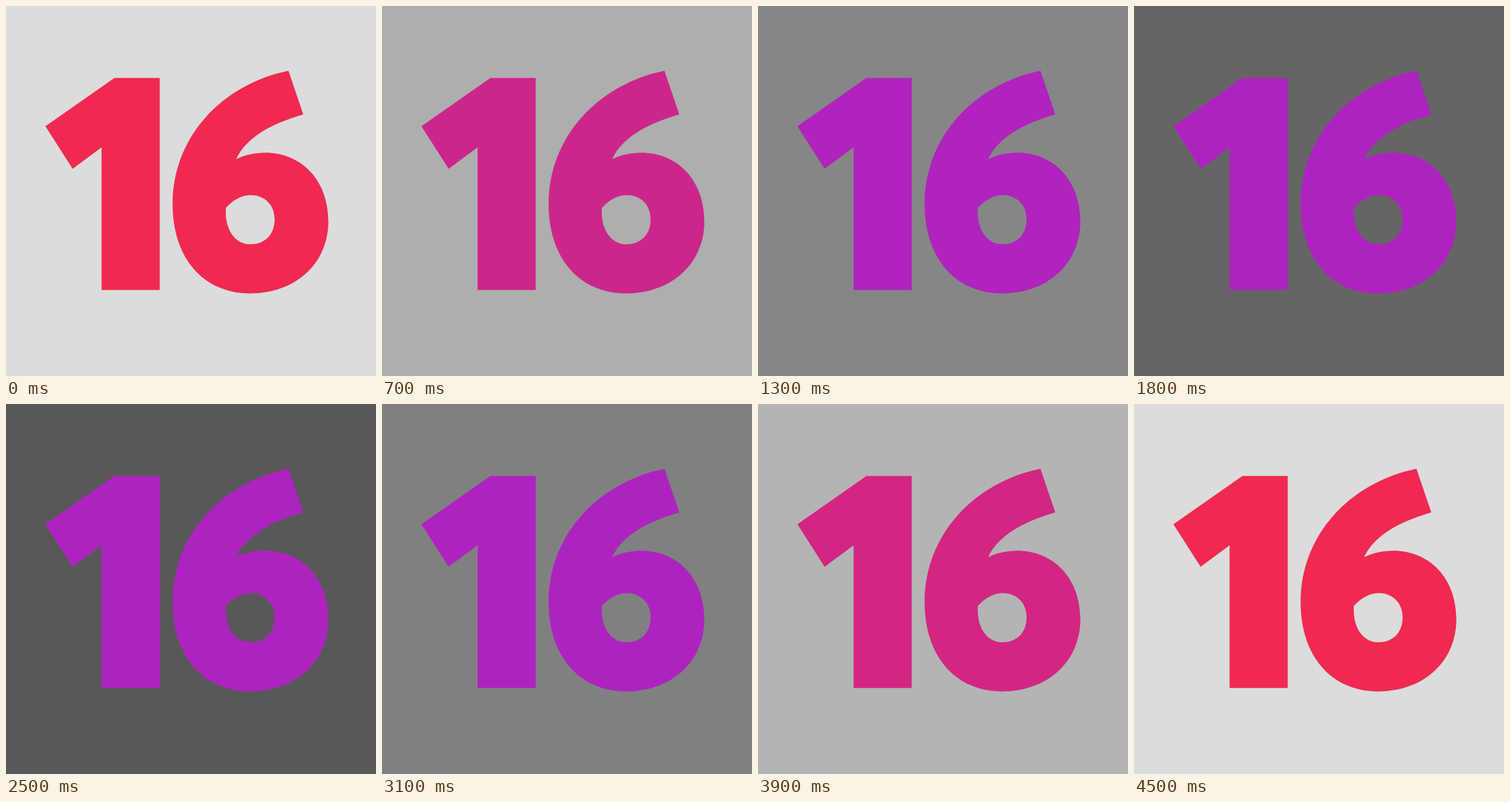
An HTML page for the animation above (4600 ms loop, 500 by 500 pixels).

```html
<!DOCTYPE html>
<html lang="en">
<head>
<meta charset="utf-8">
<title>16</title>
<style>
  html, body { margin: 0; width: 100%; height: 100%; overflow: hidden; background: #dcdcdc; }
  svg { display: block; width: 100vw; height: 100vh; }
</style>
</head>
<body>
<svg viewBox="0 0 500 500" role="img" aria-label="16">
  <rect id="ground" width="500" height="500" fill="#dcdcdc"/>
  <g id="digits" fill="#ef2950">
    <path d="M146.500 97.300H207.700V383.700H129.200V191L90 220L53.300 162.500Z"/>
    <path fill-rule="evenodd" d="M381.700 87.400L401.700 146.500C359 159 325 177 311 207
      C321 202 335 198.300 350 198.300C400 198.300 435.600 236 435.600 291C435.600 347.500 392 388.400 330 388.400
      C267 388.400 225.200 341 225.200 268C225.200 177 291.500 106 381.700 87.400Z
      M297 273C305 264 317 255.500 330 255.500C350 255.500 363 269 363 288
      C363 309 350 322 330 322C310 322 297 303 297 279Z"/>
  </g>
</svg>
<script>
  const LOOP = 4600, STEP = 100, FADE = 2000, RETURN = 2500;
  const DIGIT_RATE = 1.5; // the digits turn purple before the ground is fully dark
  const ground = document.getElementById('ground');
  const digits = document.getElementById('digits');
  const light = [220, 220, 220], dark = [88, 88, 88];
  const red = [239, 41, 80], purple = [174, 35, 192];

  const clamp = x => Math.min(1, Math.max(0, x));
  const mix = (a, b, k) => `rgb(${a.map((v, i) => Math.round(v + (b[i] - v) * k))})`;

  function draw(now) {
    const t = Math.floor(now % LOOP / STEP) * STEP;
    // Fade out, hold, then fade back
    const k = clamp(t / FADE) - clamp((t - RETURN) / FADE);
    ground.setAttribute('fill', mix(light, dark, k));
    digits.setAttribute('fill', mix(red, purple, clamp(k * DIGIT_RATE)));
  }

  const start = performance.now();
  function tick() {
    draw(performance.now() - start);
    requestAnimationFrame(tick);
  }
  tick();
</script>
</body>
</html>
```
